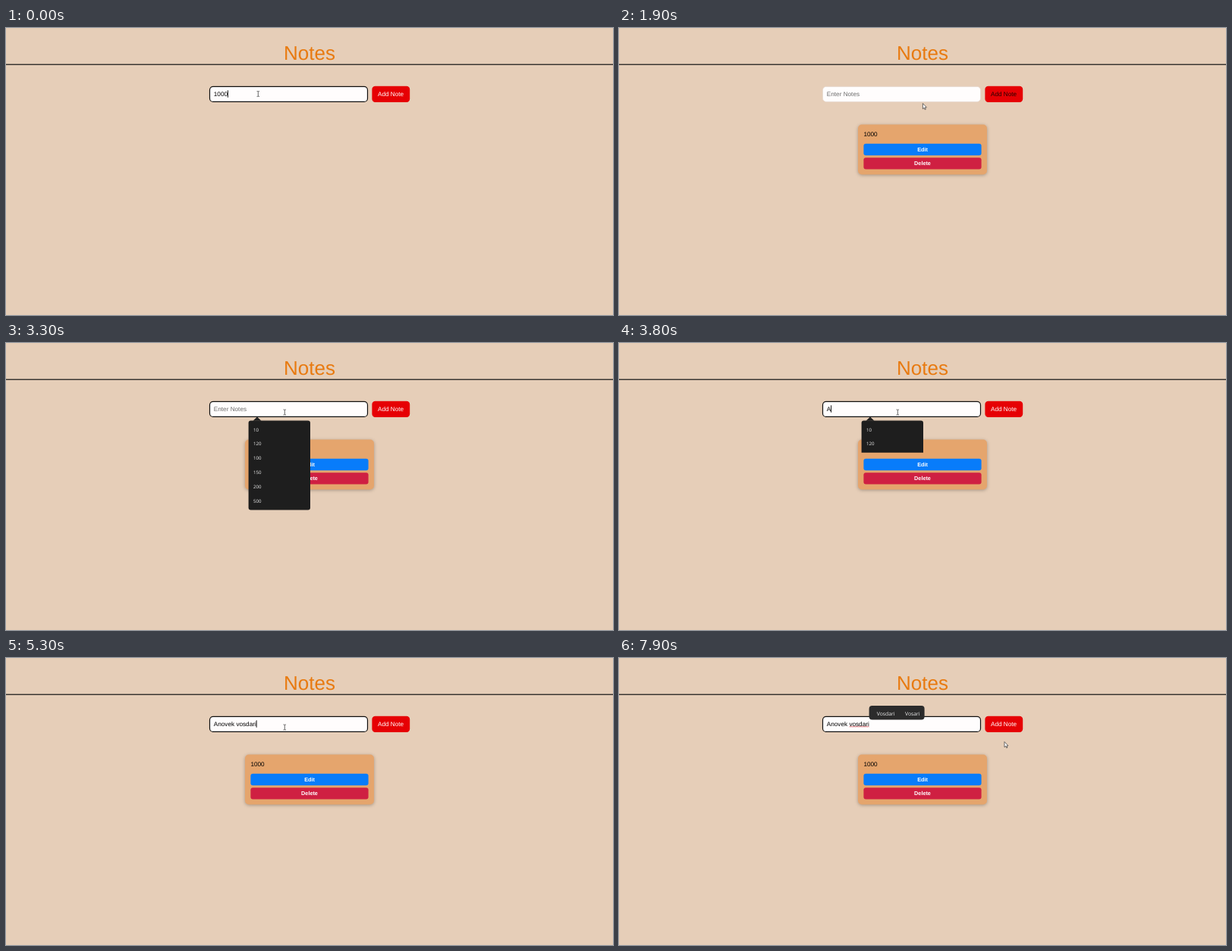
Recreate the animation shown at these times as an HTML page. Size 800 by 379 pixels, loop 8 s.

```html
<!DOCTYPE html>
<html lang="en">
<head>
<meta charset="utf-8">
<title>Notes</title>
<style>
  html, body { margin: 0; width: 100%; height: 100%; overflow: hidden; background: #e6ceb8; }
  svg { display: block; width: 100vw; height: 100vh; }
  text { font: 8.2px "Liberation Sans", Arial, sans-serif; text-rendering: geometricPrecision; white-space: pre; }
  .title { font-size: 26px; fill: #e87a10; }
  .mid { text-anchor: middle; }
  .card text.mid { font-size: 7.25px; font-weight: bold; fill: #fff; }
  .popup text { font: 6.1px "Open Sans", "Noto Sans", sans-serif; fill: #eee; }
  .popup.spell text { font-size: 6.8px; }
  .shadow { filter: drop-shadow(0 1px 2px rgba(0, 0, 0, .28)); }
</style>
</head>
<body>
<svg viewBox="0 0 800 379" preserveAspectRatio="none">
  <rect width="800" height="379" fill="#e6ceb8"/>
  <text class="title mid" x="400" y="42">Notes</text>
  <rect y="47.6" width="800" height="1.2" fill="#111"/>

  <rect id="field" x="268.5" y="77.4" width="208" height="20" rx="4.5" fill="#fffdfd"/>
  <text id="value" x="273.8" y="90"></text>
  <path id="squiggle" fill="none" stroke="#d8303a" stroke-width=".7"/>
  <rect id="caret" y="82.3" width=".9" height="9.4"/>

  <rect x="482.4" y="76.8" width="49.8" height="21.2" rx="4.2" fill="#e60004"/>
  <text id="add" class="mid" x="507" y="90">Add Note</text>

  <g id="card" class="card">
    <rect class="shadow" x="315" y="127.5" width="170" height="66" rx="5" fill="#e5a56d"/>
    <text x="322.4" y="143.3">1000</text>
    <rect x="322.4" y="152.8" width="155.2" height="15.4" rx="3" fill="#087cfa"/>
    <text class="mid" x="400" y="163.2">Edit</text>
    <rect x="322.4" y="171.2" width="155.2" height="15.4" rx="3" fill="#cf2042"/>
    <text class="mid" x="400" y="181.4">Delete</text>
  </g>

  <clipPath id="clip"><rect id="reveal" x="315" y="97" width="90"/></clipPath>
  <g id="history" class="popup" clip-path="url(#clip)">
    <path d="M325.5 102.8L331 97.6L336.5 102.8Z" fill="#1e1e1e"/>
    <rect x="319.6" y="102.4" width="81.4" height="118" rx="3" fill="#1e1e1e"/>
  </g>

  <g id="spell" class="popup spell">
    <rect x="329.6" y="63" width="73" height="18.4" rx="4" fill="#2b2b2b"/>
    <text x="339.8" y="75.6">Vosdari</text>
    <text x="377" y="75.6">Vosari</text>
  </g>

  <path id="arrow" d="M0 0V7.2L1.7 5.7L2.8 8.2L3.9 7.7L2.8 5.3H5Z" fill="#fff" stroke="#333" stroke-width=".7"/>
  <path id="beam" d="M-1.7 -3.4H-.4L0 -3L.4 -3.4H1.7M0 -3V3M-1.7 3.4H-.4L0 3L.4 3.4H1.7" fill="none" stroke="#444" stroke-width=".8"/>
</svg>
<script>
const LOOP = 8000;
const $ = id => document.getElementById(id);
const show = (id, on) => $(id).setAttribute("visibility", on ? "visible" : "hidden");
const clamp = v => Math.max(0, Math.min(1, v));
const ramp = (t, from, to) => clamp((t - from) / (to - from));
const ease = p => p * p * (3 - 2 * p);

// time, x, y
const pointer = [
  [0, 332.3, 87], [200, 332.3, 87], [800, 508, 88], [1500, 508, 88],
  [1900, 400.4, 99.6], [2000, 400.4, 99.6], [2400, 367.3, 91.4], [5500, 367.3, 91.4],
  [6100, 492, 110.6], [6400, 492, 110.6], [6900, 508, 110.6], [LOOP, 508, 110.6]
];

// time, characters typed
const NAME = "Anovek vosdari";
const keys = [
  [3750, 1], [4000, 2], [4200, 3], [4400, 4], [4550, 5], [4600, 6], [4680, 7],
  [4740, 8], [4810, 9], [4880, 10], [4950, 11], [5020, 12], [5090, 13], [5150, 14]
];

["10", "120", "100", "150", "200", "500"].forEach((label, i) => {
  const text = document.createElementNS("http://www.w3.org/2000/svg", "text");
  text.setAttribute("x", 326);
  text.setAttribute("y", 116.5 + i * 18.8);
  text.textContent = label;
  $("history").append(text);
});

let wave = "M303.5 91";
for (let x = 304.5, i = 0; x <= 330; x++, i++) wave += `L${x} ${i % 2 ? 91 : 90.4}`;
$("squiggle").setAttribute("d", wave);

function pointerAt(t) {
  const i = Math.max(1, pointer.findIndex(p => p[0] > t));
  const [a, b] = [pointer[i - 1], pointer[i]];
  const p = ease(ramp(t, a[0], b[0]));
  return [a[1] + (b[1] - a[1]) * p, a[2] + (b[2] - a[2]) * p];
}

function drawField(t) {
  const key = keys.filter(k => k[0] <= t).pop();
  const typed = t < 1000 ? "1000" : key ? NAME.slice(0, key[1]) : "";
  const focused = t < 900 || t >= 2500;
  const value = $("value");
  value.textContent = typed || "Enter Notes";
  value.setAttribute("fill", typed ? "#000" : "#6c6c6c");
  $("field").setAttribute("stroke", focused ? "#111" : "#e3d6cc");
  $("field").setAttribute("stroke-width", focused ? 1.2 : .6);

  const since = t - (key ? key[0] : t < 1000 ? 0 : 2500);
  show("caret", focused && Math.floor(since / 500) % 2 === 0);
  $("caret").setAttribute("x", 273.7 + (typed ? value.getComputedTextLength() : 0));
  show("squiggle", t >= 5500);
  show("spell", t >= 5700);
}

function drawPointer(t) {
  const [x, y] = pointerAt(t);
  const overField = x > 268 && x < 477 && y > 77 && y < 98;
  show("beam", overField);
  show("arrow", !overField);
  $(overField ? "beam" : "arrow").setAttribute("transform", `translate(${x} ${y})`);
}

function render(t) {
  drawField(t);
  const hover = ramp(t, 700, 900) - ramp(t, 1900, 2200);
  const tone = Math.round(255 * (1 - hover));
  $("add").setAttribute("fill", `rgb(${Math.max(tone, 40)},${tone},${tone})`);
  show("card", t >= 1000);

  const open = ramp(t, 3000, 3200) - ramp(t, 3680, 3877);
  show("history", open > 0);
  $("reveal").setAttribute("height", 124 * open);
  drawPointer(t);
}

const start = performance.now();
function tick() {
  render((performance.now() - start) % LOOP);
  requestAnimationFrame(tick);
}
tick();
</script>
</body>
</html>
```
